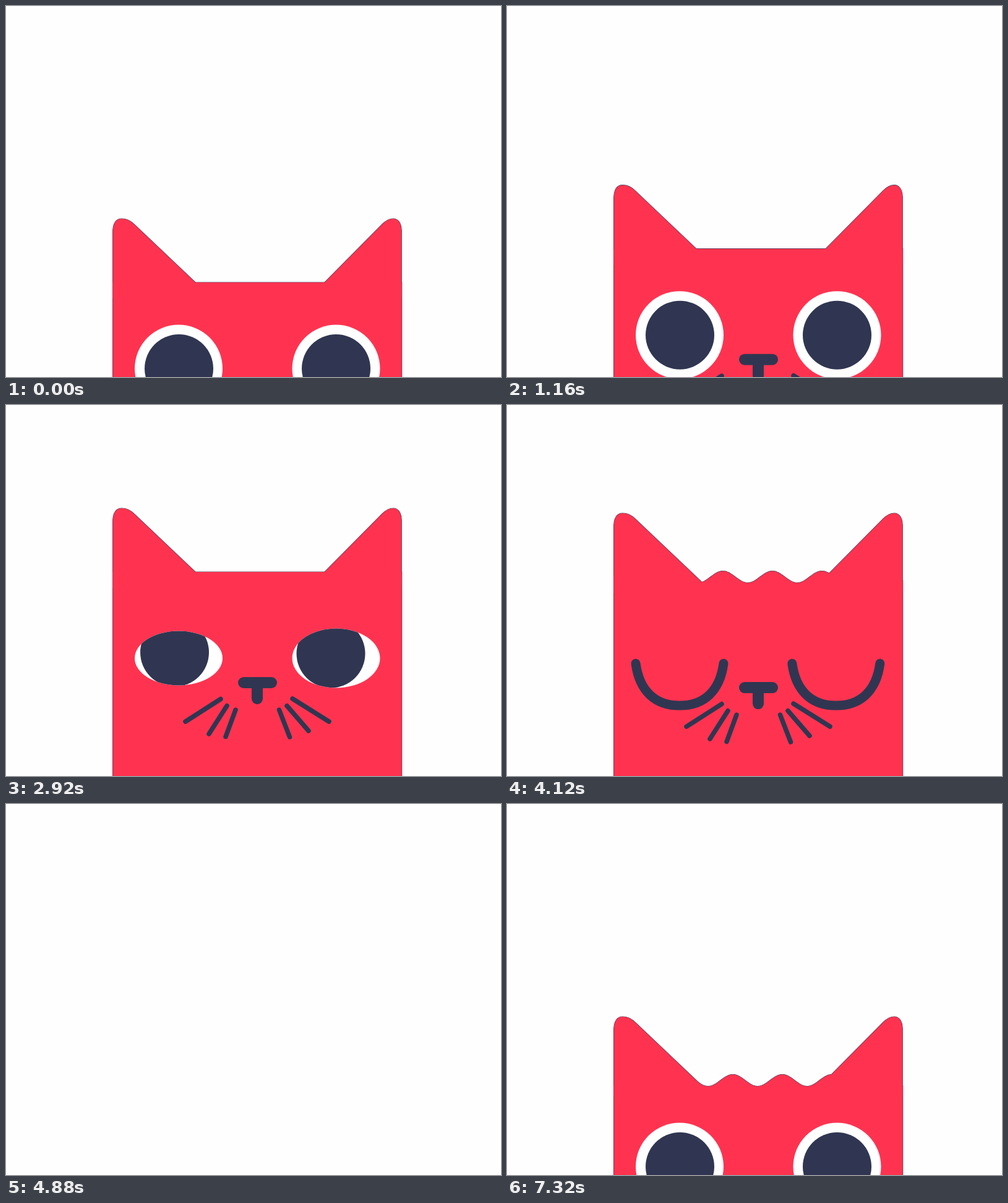
Write an HTML page with a canvas that moves like this. It is 800 by 600 pixels and loops after 7.48 s.

```html
<!DOCTYPE html>
<html lang="en">
<head>
<meta charset="utf-8">
<title>Peeking cat</title>
<style>
  html, body { margin: 0; height: 100%; overflow: hidden; background: #fefefe; }
  canvas { display: block; }
</style>
</head>
<body>
<canvas id="stage" width="800" height="600"></canvas>
<script>
const ctx = document.getElementById('stage').getContext('2d');
const LOOP = 7480, STEP = 40;
const RED = '#ff3350', DARK = '#303651', WHITE = '#fff';
const HEAD_TOP = 270, EYE_Y = 409.5;

const LEFT_EAR = new Path2D('M172.6 296V190C172.6 174 178 167 187 167C194 167 201 170 207 176L306 270L333 296Z');
const RIGHT_EAR = new Path2D('M639.2 296V186C638.6 173 633 167 626 167C620 167 614 170 608 176L515 270L489 296Z');

// x: eye centre, gaze: pupil centre when looking away, close: lid closing time
const EYES = [
  { x: 279, pupil: 279.5, gaze: [272.5, 400], close: 105 },
  { x: 533.5, pupil: 533.5, gaze: [525, 402], close: 123 }
];
const LEFT_WHISKERS = [[347, 475.5, 290, 512], [357, 486.5, 328, 532], [371, 493, 355, 536.5]];
const RIGHT_WHISKERS = [[463, 475, 522, 512], [454, 486.5, 489, 527], [441.5, 493, 458.5, 537]];

const progress = (t, from, to) => Math.min(1, Math.max(0, (t - from) / (to - from)));
const smooth = p => p * p * (3 - 2 * p);
const flick = (t, from) => Math.sin(Math.PI * progress(t, from, from + 320)) ** 2;

function headOffset(t) {
  if (t < 3920) return 177 * (1 - smooth(progress(t, 880, 1640)));
  if (t < 4880) return 432 * progress(t, 3920, 4880) ** 2.54;
  if (t < 6480) return 500;
  return 177 + 0.304 * Math.max(0, 7320 - t);
}

function bodyPath(t, offset) {
  const height = 9.5 * smooth(progress(t, 3240, 3640));
  const path = new Path2D();
  path.moveTo(172.6, 1000);
  for (let x = 172.6; x <= 639.7; x += 1) {
    const phase = 2 * Math.PI * ((x - 349) / 80 - (t - 4120) / 1000);
    path.lineTo(x, HEAD_TOP - height * Math.cos(phase));
  }
  path.lineTo(639.6, 1000);
  path.closePath();
  return path;
}

// Leans an ear outwards, keeping its base on the head.
function earPath(ear, lean, amount) {
  const path = new Path2D();
  const grow = 1 + 0.078 * amount;
  path.addPath(ear, new DOMMatrix([1, 0, lean * amount, grow, -lean * amount * HEAD_TOP, HEAD_TOP * (1 - grow)]));
  return path;
}

function line(x1, y1, x2, y2, width) {
  ctx.lineWidth = width;
  ctx.beginPath();
  ctx.moveTo(x1, y1);
  ctx.lineTo(x2, y2);
  ctx.stroke();
}

function disc(x, y, rx, ry, color) {
  ctx.fillStyle = color;
  ctx.beginPath();
  ctx.ellipse(x, y, rx, ry, 0, 0, 2 * Math.PI);
  ctx.fill();
}

function drawEye(eye, t) {
  const asleep = t >= 2920 && t < 4880;
  const open = asleep ? 1 - (t - 2880) / eye.close : 1;
  if (open > 0.04) {
    const [px, py] = t >= 2480 && t < 4880 ? eye.gaze : [eye.pupil, EYE_Y];
    ctx.save();
    disc(eye.x, EYE_Y, 71, 71 * open, WHITE);
    ctx.clip();
    disc(px, py, 55.5, 55.5, DARK);
    ctx.restore();
    return;
  }
  const bend = progress(t, 2990, 3080);
  const left = eye.x - 71, mid = eye.x, right = eye.x + 71, y = 410;
  const shift = eye.x > 400 ? -1.7 : 0;
  ctx.save();
  ctx.translate(shift, 0);
  ctx.lineWidth = 15;
  ctx.beginPath();
  ctx.moveTo(left, y);
  ctx.bezierCurveTo(left + 6, y + 45 * bend, mid - 39, y + 68 * bend, mid, y + 68 * bend);
  ctx.bezierCurveTo(mid + 39, y + 68 * bend, right - 6, y + 45 * bend, right, y);
  ctx.stroke();
  ctx.restore();
}

function drawWhisker([x1, y1, x2, y2], turn) {
  const dx = x2 - x1, dy = y2 - y1, c = Math.cos(turn), s = Math.sin(turn);
  line(x1, y1, x1 + dx * c - dy * s, y1 + dx * s + dy * c, 7.5);
}

function draw(t) {
  ctx.fillStyle = '#fefefe';
  ctx.fillRect(0, 0, 800, 600);
  ctx.save();
  ctx.translate(0, headOffset(t));
  ctx.strokeStyle = DARK;
  ctx.lineCap = 'round';
  ctx.lineWidth = 1.2;
  const shapes = [
    bodyPath(t),
    earPath(LEFT_EAR, 0.53, flick(t, 520)),
    earPath(RIGHT_EAR, -0.5, flick(t, 1640))
  ];
  shapes.forEach(shape => ctx.stroke(shape));
  ctx.fillStyle = RED;
  shapes.forEach(shape => ctx.fill(shape));

  EYES.forEach(eye => drawEye(eye, t));
  line(384, 449, 429, 449, 18);
  line(406, 449, 406, 475, 18);
  const twitch = 0.112 * flick(t, 1440);
  LEFT_WHISKERS.forEach(w => drawWhisker(w, twitch));
  RIGHT_WHISKERS.forEach(w => drawWhisker(w, 0));
  ctx.restore();
}

const start = performance.now();
function tick() {
  const t = (performance.now() - start) % LOOP;
  draw(Math.floor(t / STEP) * STEP);
  requestAnimationFrame(tick);
}
tick();
</script>
</body>
</html>
```
